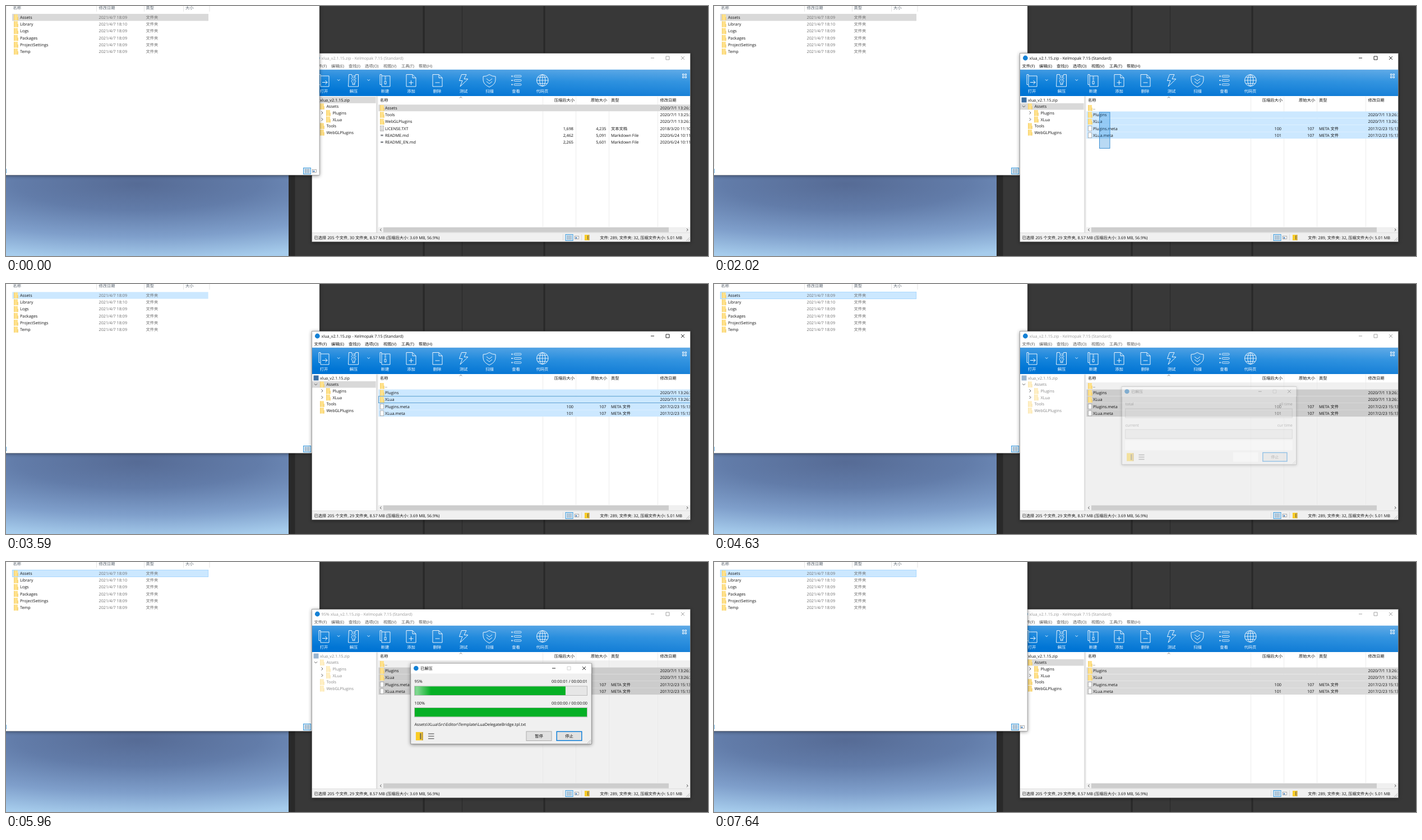
These frames come from a looping animation (1252 by 447 pixels, 8 s). An HTML page:

```html
<!DOCTYPE html>
<html lang="en">
<head>
<meta charset="utf-8">
<title>Extracting an archive</title>
<style>
html, body { margin: 0; width: 100%; height: 100%; overflow: hidden; background: #383838; }
svg { display: block; width: 1252px; height: 447px; }
text { font: 7.25px "Open Sans", "Noto Sans CJK SC", "Noto Sans CJK", sans-serif; text-rendering: geometricPrecision; }
.window { filter: drop-shadow(0 1.5px 3px rgba(0, 0, 0, .45)); }
</style>
</head>
<body>
<svg id="stage" viewBox="0 0 1252 447"></svg>
<script>
const LOOP = 8000, TICK = 70;
const stage = document.getElementById('stage');

// Drawing helpers; text is placed by the middle of its line.
const rect = (x, y, w, h, fill, more = '') =>
  `<rect x="${x}" y="${y}" width="${w}" height="${h}" fill="${fill}" ${more}/>`;
const text = (x, y, s, fill = '#111', more = '') =>
  `<text x="${x}" y="${y + 2.6}" fill="${fill}" ${more}>${s}</text>`;
const right = (x, y, s, fill) => text(x, y, s, fill, 'text-anchor="end"');
const middle = (x, y, s, fill) => text(x, y, s, fill, 'text-anchor="middle"');
const line = (d, color, width = 1) =>
  `<path d="${d}" fill="none" stroke="${color}" stroke-width="${width}"/>`;
const disc = (x, y, r, fill) => `<circle cx="${x}" cy="${y}" r="${r}" fill="${fill}"/>`;
const group = (body, more) => `<g ${more}>${body}</g>`;
const box = (x, y, w, h, fill, edge) =>
  rect(x + .5, y + .5, w - 1, h - 1, fill, `stroke="${edge}"`);

// Step tables: the last entry at or before t holds.
const at = (steps, t) => steps.reduce((v, s) => s[0] <= t ? s[1] : v, steps[0][1]);
const ramp = (keys, t) => {
  if (t <= keys[0][0]) return keys[0][1];
  for (let i = 1; i < keys.length; i++) {
    const [a, u] = keys[i - 1], [b, v] = keys[i];
    if (t <= b) return u + (v - u) * (t - a) / (b - a);
  }
  return keys[keys.length - 1][1];
};

const folder = (x, y) =>
  rect(x, y - 5.3, 7, 10.6, '#ffe18a') + rect(x + 6.2, y - .5, 1.5, 5.8, '#f5cf67') +
  rect(x, y - 5.3, .8, 10.6, '#f3cb60');
const sheet = (x, y, lines) =>
  rect(x + .5, y - 4.5, 6.2, 9, '#fff', 'stroke="#999" stroke-width=".7"') +
  (lines ? [-2.5, -.5, 1.5, 3].map(d => line(`M${x + 1.5} ${y + d}h4`, '#888', .6)).join('') : '');
const mark = (x, y) =>
  rect(x + 1, y - 1.5, 5, 3, '#a9adb3') + line(`M${x + 2} ${y}h3`, '#555', .8);
const listIcon = (x, y) =>
  box(x, y - 6, 14, 12, '#d5ebfb', '#3e9ada') +
  [-3, -1, 1, 3].map(d => line(`M${x + 3} ${y + d}h2M${x + 6} ${y + d}h2M${x + 9} ${y + d}h2`, '#567', .8)).join('');
const tileIcon = (x, y) =>
  rect(x - 3.5, y - 2.5, 7, 5, '#fff', 'stroke="#888" stroke-width=".7"') +
  rect(x - 2.5, y - .5, 3, 2, '#3674b5');
const packIcon = (x, y, s) =>
  group(rect(-4.5, -5.5, 8, 11, '#f9cc26') + rect(1, -4, 1.5, 8, '#6f6750') +
    rect(3.5, -5.5, 1.5, 11, '#c79a25'), `transform="translate(${x} ${y}) scale(${s})"`);
const caption = (x, y, color, maxColor = color) =>
  line(`M${x - 3} ${y}h6`, color, .9) +
  line(`M${x + 24} ${y - 3}h6v6h-6z`, maxColor, .9) +
  line(`M${x + 51} ${y - 3}l6 6m0-6l-6 6`, color, .9);

const gradient = (tag, id, attrs, stops) => `<${tag} id="${id}" ${attrs}>` +
  stops.map(([o, c, a = 1]) => `<stop offset="${o}" stop-color="${c}" stop-opacity="${a}"/>`).join('') + `</${tag}>`;
const defs = `<defs>
${gradient('radialGradient', 'sky', 'gradientUnits="userSpaceOnUse" cx="0" cy="0" r="1" gradientTransform="translate(235 318) scale(620 135)"',
    [[0, '#566b95'], [.35, '#627ca9'], [.7, '#7f9fcb'], [1, '#a6ccec']])}
${gradient('linearGradient', 'bar', 'x1="0" y1="0" x2="0" y2="1"', [[0, '#1c86dc'], [.45, '#0079d8'], [1, '#0073d3']])}
${gradient('linearGradient', 'sheen', 'x1=".3" y1="1" x2="1" y2="0"', [[0, '#fff', 0], [1, '#fff', .3]])}
${gradient('linearGradient', 'glow', '', [[0, '#fff', 0], [.5, '#fff', .5], [1, '#fff', 0]])}
<clipPath id="list"><rect x="664" y="162" width="556" height="234"/></clipPath></defs>`;

const desktop = rect(0, 0, 1252, 447, '#383838') +
  rect(504, 302, 11.5, 145, '#292929') + rect(743.5, 0, 3.2, 447, '#282828') +
  rect(813, 0, 1, 447, '#292929') + rect(958.5, 0, 3, 447, '#282828') +
  rect(0, 300, 504, 147, 'url(#sky)');

// File manager window
const rowY = i => 20.3 + i * 12.24;
const dirs = ['Assets', 'Library', 'Logs', 'Packages', 'ProjectSettings', 'Temp'];
const dropRow = [[0, -1], [3240, 4], [3310, 3], [3380, 2], [3450, 1], [3520, 0]];

function explorer(t, front) {
  let s = rect(-10, -10, 569, 312.3, '#fff', `class="window" stroke="${front ? '#777' : '#999'}" stroke-width=".5"`);
  s += line('M.5 0V287', '#eee') + rect(0, 291, 1, 8, '#69b2e5');
  s += line('M161.5 0V10M246.5 0V10M316.5 0V10M363 0V10', '#e4e4e4');
  [[12.5, '名称'], [165.5, '修改日期'], [249.5, '类型'], [320, '大小']]
    .forEach(([x, name]) => s += text(x, 3, name, '#5b6570'));
  const drop = at(dropRow, t);
  dirs.forEach((name, i) => {
    const y = rowY(i);
    if (i === drop) s += rect(11.3, y - 6, 349.4, 12.2, '#cce8ff', t >= 4430 ? 'stroke="#99d1ff" stroke-width=".8"' : '');
    else if (!i) s += rect(11, y - 6.2, 350, 12.5, '#d9d9d9');
    s += folder(14, y) + text(25, y, name) +
      text(165.5, y, `2021/4/7 18:${i === 1 ? '10' : '09'}`, '#6d6d6d') + text(249.5, y, '文件夹', '#6d6d6d');
  });
  return s + listIcon(530, 295) + tileIcon(550, 295);
}

// Archive window
const doc = (x, sign) => line(`M${x - 8.5} 122.5h11l6 6v15.5h-17zM${x + 2.5} 122.5v6h6`, '#fff', .9) +
  line(`M${x - 4} 137h8` + (sign ? `M${x} 133v8` : ''), '#fff', .9);
const stack = x => line(`M${x - 6} 125v-2.5h-3v18h2.500M${x - 6} 125h15v19h-15z`, '#fff', .9);
const toolIcons = stack(567) + line('M564 136.500h9m-3.500-3.500l3.500 3.500l-3.500 3.500', '#fff') +
  line('M611.5 122.500h5l1.500 5l-2 2l2 2l-2 3l2 3v3h4v-3l2-3l-2-3l2-2l-2-2l1.500-5h5v21.500h-18z', '#fff', .9) +
  line('M619 125h3m-3 3h3m-3 3h3m-3 3h3m-3 4h3', '#fff', .8) +
  stack(676) + line('M675 127h3m-3 2.500h3m-3 2.500h3m-3 2.500h3v5h-3z', '#fff', .9) +
  doc(722.5, true) + doc(769.500, false) +
  line('M812.500 122.500h8.500l-4 8h7l-14 13.500l4-10.500h-5.500z', '#fff', .9) +
  line('M862 122.500q5 3.500 11 3.500v6q0 8-11 13q-11-5-11-13v-6q6 0 11-3.500zM857 130l5 4l5-4M857 135l5 4l5-4', '#fff', .9) +
  [125.500, 133, 140.500].map(y => rect(901.500, y - 1, 2, 2, '#fff') +
    rect(906, y - 1.500, 13, 3, 'none', 'rx="1.500" stroke="#fff" stroke-width=".8"')).join('') +
  '<g fill="none" stroke="#fff" stroke-width=".9"><circle cx="956.800" cy="133" r="10.300"/><ellipse cx="956.800" cy="133" rx="5" ry="10.300"/></g>' +
  line('M946.500 133h20.600M956.800 122.700v20.600M948.500 127.500h16.600M948.500 138.500h16.600', '#fff', .8);
const tools = [[567, '打开'], [620, '解压'], [676, '新建'], [722.5, '添加'], [769, '删除'],
  [816, '测试'], [862.5, '扫描'], [909.5, '查看'], [956.5, '代码页']];
const menus = [[549.5, '文件(F)'], [580, '编辑(E)'], [611, '查找(I)'], [640, '选项(O)'],
  [673, '视图(V)'], [705, '工具(T)'], [736, '帮助(H)']];

const rootFiles = [
  ['Assets', folder, '', '', '', '2020/7/1 13:26:30'],
  ['Tools', folder, '', '', '', '2020/7/1 13:25:30'],
  ['WebGLPlugins', folder, '', '', '', '2020/7/1 13:26:30'],
  ['LICENSE.TXT', (x, y) => sheet(x, y, true), '1,698', '4,235', '文本文档', '2018/3/20 11:10'],
  ['README.md', mark, '2,462', '5,091', 'Markdown File', '2020/6/24 10:11'],
  ['README_EN.md', mark, '2,265', '5,601', 'Markdown File', '2020/6/24 10:11']];
const assetFiles = [
  ['..', folder, '', '', '', ''],
  ['Plugins', folder, '', '', '', '2020/7/1 13:26:30'],
  ['XLua', folder, '', '', '', '2020/7/1 13:26:30'],
  ['Plugins.meta', sheet, '100', '107', 'META 文件', '2017/2/23 15:13'],
  ['XLua.meta', sheet, '101', '107', 'META 文件', '2017/2/23 15:13']];
const tree = [[0, 'xlua_v2.1.15.zip'], [1, 'Assets', 'M550 178.300l2.500 2.500l2.500-2.500'],
  [2, 'Plugins', 'M562.500 188.500l2.500 2.500l-2.500 2.500'], [2, 'XLua', 'M562.500 200.200l2.500 2.500l-2.500 2.500'],
  [1, 'Tools'], [1, 'WebGLPlugins']];

const hover = [[0, -1], [290, 0], [360, 1], [430, 2], [500, 1], [560, 0], [840, -1],
  [1100, 0], [1330, 1], [1600, -1], [2630, 3], [2880, 2], [3150, -1]];
const lastPicked = [[0, 0], [1880, 1], [1950, 3], [2020, 4]];
const dragEnd = [[1880, [700, 197]], [1950, [692, 226]], [2020, [687, 255]]];

const fileY = i => 182.3 + i * 12.23;

function fileRow(t, file, i, inside) {
  const [name, icon, packed, size, type, date] = file, y = fileY(i);
  const over = at(hover, t) === i;
  const picked = inside ? i > 0 && i <= at(lastPicked, t) : i === 0;
  let fill = over ? '#e5f3ff' : 'none', edge = 'none';
  if (picked) {
    fill = '#cce8ff';
    if (over || (!inside && t >= 840)) edge = '#99d1ff';
    if (inside && i === 2 && t >= 3150 && t < 4430) edge = '#3185c0';
    if (!inside && t < 840) fill = '#d9d9d9';
    if (t >= 4430) fill = t < 7150 ? '#cccccc' : '#d9d9d9';
  }
  return rect(664.4, y - 6, 557, 11.9, fill, `stroke="${edge}" stroke-width=".8"`) +
    icon(667, y) + text(676, y, name) + right(1012, y, packed) + right(1070.5, y, size) +
    text(1079, y, type) + text(1166.5, y, date);
}

function archive(t) {
  const active = t >= 960 && t < 4430, inside = t >= 1030, locked = t >= 4430 && t < 7150;
  const ink = active ? '#111' : '#999';
  const pct = t >= 5190 && t < 6940 ? percent(t) + '% ' : '';
  let s = rect(545.7, 84.7, 674.6, 336.8, '#fff', 'class="window" stroke="#777" stroke-width=".6"');
  s += disc(555.3, 93, 4.4, '#1481d5') +
    text(562.5, 93, pct + 'xlua_v2.1.15.zip - Kelmopak 7.15 (Standard)', ink) + caption(1153, 93, ink);
  menus.forEach(([x, name]) => s += text(x, 107.7, name, active ? '#111' : '#555'));
  s += rect(546, 113.800, 674, 47.200, 'url(#bar)') + rect(546, 113.800, 674, 47.200, 'url(#sheen)');
  if (t >= 150 && t < 290) s += rect(700, 114, 46, 47, '#fff', 'opacity=".15"');
  s += toolIcons + line('M591 131.300l2.200 2.200l2.200-2.200M644.500 131.300l2.200 2.200l2.200-2.200', '#fff', .9);
  s += line('M1206.500 121.500h2.500v2.500h-2.500zM1211 121.500h2.500v2.500h-2.500zM1206.500 126h2.500v2.500h-2.500zM1211 126h2.500v2.500h-2.500z', '#fff', .9);
  tools.forEach(([x, name]) => s += middle(x, 152, name, '#fff'));

  const selected = inside ? 1 : 0;
  let nodes = '';
  tree.forEach(([depth, name, arrow], i) => {
    const y = 168 + i * 11.66, x = 549 + depth * 11;
    if (i === selected && !locked) s += rect(546, y - 5.8, 113.500, 11.600, '#d9d9d9');
    nodes += (depth ? folder(x, y) : rect(548.500, y - 4.500, 9, 9, '#3a6fa5')) +
      text(depth ? x + 11.5 : 560, y, name);
    if (arrow) s += line(arrow, '#444', .9);
  });
  s += group(nodes, `opacity="${locked ? .5 : 1}"`);

  s += rect(660, 161.500, 3, 244, '#e9e9e9') + line('M660.500 162V405M663 162V405', '#d0d0d0', .6);
  if (locked) s += rect(664, 176, 556, 220, '#f0f0f0');
  s += line('M957.500 162V395M1016.500 162V395M1075.500 162V395M1162.500 162V395', '#e8e8e8', .8) +
    line('M809 164.500l2.200-2l2.200 2', '#555', .8);
  s += text(667, 168.700, '名称') + right(1014, 168.700, '压缩后大小') + right(1072, 168.700, '原始大小') +
    text(1079, 168.700, '类型') + text(1166.5, 168.700, '修改日期');
  const files = inside ? assetFiles : rootFiles;
  s += group(files.map((f, i) => fileRow(t, f, i, inside)).join(''), 'clip-path="url(#list)"');
  if (t >= 1880 && t < 2530) {
    const [x, y] = at(dragEnd, t);
    s += rect(x + .5, 190, 705.5 - x, y - 190.5, '#0078d7', 'fill-opacity=".28" stroke="#2f87cf" stroke-width=".9"');
  }

  s += rect(664, 395.500, 556, 9.500, '#f0f0f0') + rect(673, 395.800, 509, 8.700, '#cdcdcd') +
    line('M669.500 398l-2.200 2.200l2.200 2.200M1214 398l2.200 2.200l-2.200 2.200', '#444');
  s += rect(546, 405.500, 674, 15.700, '#f0f0f0') + line('M546 405.500h674', '#d7d7d7', .7) +
    line('M993.500 408v11M1026.500 408v11', '#d5d5d5', .8);
  s += text(549.5, 414, `已选择 205 个文件, ${inside ? 29 : 30} 文件夹, 8.57 MB (压缩后大小: 3.69 MB, 56.9%)`) +
    right(1206, 414, '文件: 289, 文件夹: 32, 压缩文件大小: 5.01 MB');
  s += listIcon(997.500, 414) + tileIcon(1018, 414) + packIcon(1036, 414, .9);
  return s + line('M1213 420l6-6M1216 420l3-3', '#aaa', .8);
}

// Progress dialog
const fade = [[0, 0], [4560, .14], [4630, .4], [4700, .65], [4770, .85], [4840, 1],
  [7010, .65], [7080, .25], [7150, 0]];
const zoom = [[0, .95], [4630, .966], [4700, .98], [4770, .992], [4840, 1], [7010, .985], [7080, .965]];
const done = [[4840, 0], [5190, .6], [5960, .873], [6310, .95], [6870, .95], [6940, 1]];
const percent = t => Math.floor(ramp([[4840, 0], [5190, 90], [5960, 95], [6870, 95], [6940, 100]], t));
const extracted = ['Src\\Editor\\Template\\LuaDelegateBridge.tpl.txt', 'Src\\Editor\\Template\\LuaClassWrap.tpl.txt',
  'Src\\Editor\\Generator.cs', 'Src\\GenericDelegateBridge.cs', 'Src\\ObjectTranslator.cs',
  'Src\\TypeExtensions.cs', 'Src\\StaticLuaCallbacks.cs', 'Resources\\xlua\\util.lua.txt',
  'Tutorial\\LoadLuaScript\\ByFile\\ByFile.cs', 'Src\\SignatureLoader.cs', 'Src\\LuaTable.cs'];

function dialog(t) {
  const alpha = at(fade, t), scale = at(zoom, t), early = t < 4840;
  if (!alpha) return '';
  const ink = early ? '#666' : '#111', second = t < 5400 ? '00' : t < 6520 ? '01' : '02';
  const fill = 308 * ramp(done, t), x = 708 + (t + 940) % 2300 * .22;
  const left = Math.max(729, x), end = Math.min(729 + fill, x + 50);
  let s = rect(721.8, 181.3, 322.4, 144, '#f0f0f0', 'class="window" stroke="#777" stroke-width=".7"') +
    rect(722, 181.600, 322, 17.800, '#fff') + disc(731.3, 190, 4.3, '#1481d5') +
    text(739, 190, '已解压', ink) + caption(977, 190, ink, '#ccc');
  s += text(728.5, 213, early ? 'total' : percent(t) + '%', ink) +
    right(1037, 213, early ? 'all time' : `00:00:${second} / 00:00:${second}`, ink) +
    text(728.5, 252, early ? 'current' : '100%', ink) +
    right(1037, 252, early ? 'cur time' : '00:00:00 / 00:00:00', ink);
  s += box(728, 221.500, 309, 17.500, '#e6e6e6', '#bcbcbc') + box(728, 260, 309, 17.500, '#e6e6e6', '#bcbcbc');
  if (early) s += rect(728, 280, 309, 19, '#fff');
  else {
    s += rect(729, 222.500, fill, 15.500, '#06b025') + rect(729, 261, 307, 15.500, '#06b025');
    if (end > left) {
      s += `<svg x="${left}" y="222.500" width="${end - left}" height="15.500">` +
        rect(x - left, 0, 50, 15.5, 'url(#glow)') + '</svg>';
    }
    const n = Math.round((t - 5960) / TICK) * 3;
    const size = extracted.length;
    s += text(728.5, 290, 'Assets\\XLua\\' + extracted[(n % size + size) % size]);
  }
  s += packIcon(737, 311.500, 1.35) + line('M753 307.300h10.500M753 311.500h10.500M753 315.700h10.500', '#777', 1.5);
  s += early ? rect(927.500, 302.500, 46, 17.500, '#fff') :
    box(927.500, 302.500, 46, 17.500, '#e1e1e1', '#adadad') + middle(950.5, 311.300, '暂停');
  s += rect(982.2, 303.200, 44.600, 16.100, '#e1e1e1', 'stroke="#0078d7" stroke-width="1.400"') +
    middle(1004.5, 311.300, '停止', ink) + line('M1037 324l6-6M1040 324l3-3', '#aaa', .8);
  return group(s, `opacity="${alpha}" transform="translate(883 253) scale(${scale}) translate(-883 -253)"`);
}

function scene(t) {
  const front = t < 840 || t >= 7290;
  const files = explorer(t, front), zip = archive(t) + dialog(t);
  return defs + desktop + (front ? zip + files : files + zip);
}

// Moving parts advance in even ticks; everything else follows its step table.
let shown = '';
function frame(now) {
  const t = now % LOOP;
  const inDialog = t >= 4840 && t < 7150;
  const next = scene(inDialog ? Math.floor((t - 10) / TICK) * TICK + 10 : t);
  if (next !== shown) stage.innerHTML = shown = next;
  requestAnimationFrame(frame);
}
const start = performance.now();
frame(0);
requestAnimationFrame(function run(now) { frame2(now); });
function frame2(now) { frame(Math.max(0, now - start)); }
</script>
</body>
</html>
```
